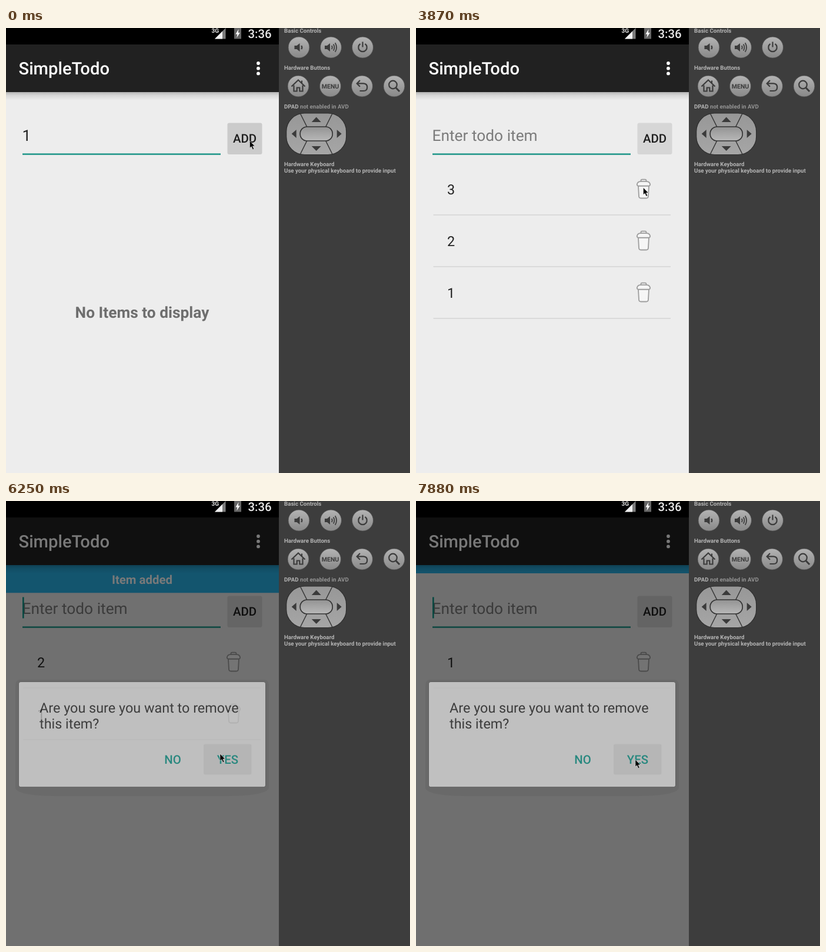
These frames come from a looping animation (687x757 px, 8000 ms). An HTML page:

```html
<!DOCTYPE html>
<html lang="en">
<head>
<meta charset="utf-8">
<title>Todo list</title>
<style>
  html, body { margin: 0; width: 100%; height: 100%; overflow: hidden; background: #3d3d3d; }
  svg { display: block; width: 687px; height: 757px; font-family: Roboto, sans-serif; text-rendering: geometricPrecision; }
  .mid { text-anchor: middle; }
  .medium { font-weight: 500; }
  .bold { font-weight: 700; }
  .f14 { font-size: 20.4px; }
  .f16 { font-size: 23.4px; }
  .f18 { font-size: 26.3px; }
  .label { font-size: 9.7px; font-weight: 700; fill: #b4b4b4; }
  .icon { fill: none; stroke: #3b3b3b; stroke-width: 2.2; }
  .solid { fill: #3b3b3b; }
</style>
</head>
<body>
<svg viewBox="0 0 687 757">
  <defs>
    <linearGradient id="shade" x2="0" y2="1">
      <stop offset="0" stop-opacity=".24"/><stop offset=".4" stop-opacity=".09"/><stop offset="1" stop-opacity="0"/>
    </linearGradient>
    <linearGradient id="metal" x2="0" y2="1">
      <stop offset="0" stop-color="#b4b4b4"/><stop offset="1" stop-color="#888"/>
    </linearGradient>
    <linearGradient id="pad" x2="0" y2="1">
      <stop offset="0" stop-color="#979797"/><stop offset="1" stop-color="#a6a6a6"/>
    </linearGradient>
    <linearGradient id="pill" x2="0" y2="1">
      <stop offset="0" stop-color="#939393"/><stop offset="1" stop-color="#b8b8b8"/>
    </linearGradient>
    <circle id="knob" r="18" fill="url(#metal)" stroke="#4c4c4c" stroke-width=".8"/>
    <g id="bin" fill="#f6f6f6" stroke="#9d9d9d" stroke-width="1.8" stroke-linejoin="round">
      <path d="M-9 -5L-8 12.5Q-7.8 16 -4.5 16H4.5Q7.8 16 8 12.5L9 -5Z"/>
      <path d="M-4.5 -12V-14Q-4.5 -15.8 -2.5 -15.8H2.5Q4.5 -15.8 4.5 -14V-12" fill="none"/>
      <path d="M-11.2 -7.5Q-10 -12.3 -5 -12.3H5Q10 -12.3 11.2 -7.5Q11 -5 9 -4.8H-9Q-11 -5 -11.2 -7.5Z"/>
    </g>
    <clipPath id="phone"><path d="M0 0H464V757H0Z"/></clipPath>
  </defs>

  <g clip-path="url(#phone)">
    <path fill="#ededed" d="M0 0H464V757H0Z"/>
    <text id="empty" class="mid bold f18" x="231.5" y="493" fill="#6e6e6e">No Items to display</text>

    <text id="hint" class="f18" x="27.5" y="192" fill="#7b7b7b">Enter todo item</text>
    <text id="typed" class="f18" x="27.5" y="192" fill="#212121"></text>
    <path fill="#2d9c90" d="M28 213.2H365V216.1H28Z"/>
    <rect id="caret" y="163.5" width="2.6" height="36" fill="#0f998b"/>

    <rect id="glow" x="375.5" y="163" width="61.5" height="54" rx="4" opacity="0"/>
    <rect id="add" x="376.5" y="161.5" width="59" height="53.5" rx="3"/>
    <text class="mid medium f14" x="406" y="195.3" fill="#1c1c1c">ADD</text>
    <g id="rows"></g>

    <g id="banner">
      <path fill="#29b3e8" d="M0 109H464V156.2H0Z"/>
      <text class="mid bold f14" x="231.5" y="141" fill="#fff">Item added</text>
    </g>
    <path fill="url(#shade)" d="M0 109H464V123H0Z"/>
    <path fill="#212121" d="M0 28H464V109H0Z"/>
    <text class="medium" font-size="29.2" x="21.5" y="79" fill="#fff">SimpleTodo</text>
    <g fill="#fff"><circle cx="429" cy="60" r="2.9"/><circle cx="429" cy="68.7" r="2.9"/><circle cx="429" cy="77.4" r="2.9"/></g>

    <path id="dim" d="M0 28H464V757H0Z"/>
    <g id="dialog">
      <path opacity=".08" d="M22 304H441Q447 306 447 314V489Q440 502 370 502H92Q22 502 16 489V314Q16 306 22 304Z"/>
      <rect x="22" y="308" width="419" height="178.3" rx="3" stroke="#000" stroke-opacity=".3"/>
      <rect x="22" y="308" width="419" height="178.3" rx="3" fill="#ededed"/>
      <g class="f16" fill="#212121">
        <text x="57" y="359.5">Are you sure you want to remove</text>
        <text x="57" y="386.5">this item?</text>
      </g>
      <rect id="yes" x="336" y="413.5" width="81.5" height="52" rx="3" fill="#dedede"/>
      <g class="mid medium f14" fill="#009688">
        <text x="283.5" y="447">NO</text>
        <text x="377" y="447">YES</text>
      </g>
    </g>

    <path d="M0 0H464V28H0Z"/>
    <text class="bold" font-size="10" x="349.5" y="8" fill="#e6e6e6">3G</text>
    <path fill="#7d7d7d" d="M373.5 0V18.5H355Z"/>
    <path fill="#f2f2f2" d="M368 5.5V18.5H355Z"/>
    <path fill="#666" d="M388 0H400V18.5H388Z"/>
    <path fill="#fff" d="M395.5 2L390.5 10.5H393.4L392.3 16.5L397.8 8H394.7Z"/>
    <text class="medium f14" x="411.5" y="17.3" fill="#e8e8e8">3:36</text>
  </g>

  <g class="label">
    <text x="473" y="8">Basic Controls</text>
    <text x="473" y="71.3">Hardware Buttons</text>
    <text x="473" y="136.8">DPAD <tspan fill="#939393">not enabled in AVD</tspan></text>
    <text x="473" y="235">Hardware Keyboard</text>
    <text x="473" y="246">Use your physical keyboard to provide input</text>
  </g>

  <g transform="translate(498 33)">
    <use href="#knob"/>
    <path class="solid" d="M-7.5 -3H-3.5L1.5 -7V7L-3.5 3H-7.5Z"/>
    <path class="icon" d="M4.3 -3Q6.3 0 4.3 3"/>
  </g>
  <g transform="translate(552.5 33)">
    <use href="#knob"/>
    <path class="solid" d="M-10.5 -3H-6.5L-1.5 -7V7L-6.5 3H-10.5Z"/>
    <path class="icon" style="stroke-width:1.7" d="M1.3 -3Q3.3 0 1.3 3M4.2 -5.5Q7.6 0 4.2 5.5M7.2 -7.8Q12 0 7.2 7.8"/>
  </g>
  <g transform="translate(606.5 33)">
    <use href="#knob"/>
    <path class="icon" d="M-4 -6A7.2 7.2 0 1 0 4 -6M0 -9.5V-.5"/>
  </g>
  <g transform="translate(497 99)">
    <use href="#knob"/>
    <path class="icon" d="M-11.5 .5L0 -10.5L11.5 .5M-7.5 -1.5V8.5H-2.3V2.5H2.3V8.5H7.5V-1.5M6 -5V-9.5"/>
  </g>
  <g transform="translate(551.5 99)">
    <use href="#knob"/>
    <text class="mid bold solid" font-size="10.5" y="4">MENU</text>
  </g>
  <g transform="translate(605.5 99)">
    <use href="#knob"/>
    <path class="icon" d="M-3.5 -10L-8.8 -4.6L-3.5 .8M-8.5 -4.6H2.5Q8.7 -4.2 8.7 1.8Q8.7 8 2.5 8H-4"/>
  </g>
  <g transform="translate(660 99)">
    <use href="#knob"/>
    <circle class="icon" cx="-2" cy="-2.5" r="6.8"/>
    <path class="icon" style="stroke-width:3" d="M3 2.8L9.2 9"/>
  </g>

  <g transform="translate(527.7 180)">
    <rect x="-51" y="-35" width="102" height="70.5" rx="31" fill="url(#pad)" stroke="#2d2d2d" stroke-width="1.2"/>
    <path d="M-27 -34L-16 -12M27 -34L16 -12M-27 34L-16 12M27 34L16 12" stroke="#353535" stroke-width="1.5"/>
    <rect x="-27.5" y="-12" width="55" height="24" rx="11.5" fill="url(#pill)" stroke="#333" stroke-width="1.7"/>
    <path class="solid" d="M-8 -20H8L0 -28.5ZM-8 21H8L0 29ZM-34 -7V7L-42 0ZM35 -7V7L43 0Z"/>
  </g>

  <path id="pointer" d="M0 0V12L2.8 9.7L5 14.7L7.1 13.8L4.9 8.9H8.6Z" stroke="#fff" stroke-width=".5"/>
</svg>
<script>
  const LOOP = 8000, TICK = 148.6, ROW = 88, BANNER = 48;
  const $ = id => document.getElementById(id);
  const set = (id, attrs) => { for (const k in attrs) $(id).setAttribute(k, attrs[k]); };

  // The user's actions, in ms.
  const entries = [
    { text: '1', typed: -600, press: -40, add: 145 },
    { text: '2', typed: 1780, press: 1990, add: 2075 },
    { text: '3', typed: 2970, press: 2880, add: 3080 },
  ];
  const banners = [{ open: 130, close: 3490 }, { open: 3885, close: 7625 }];
  const dialogs = [{ open: 5060, close: 6150 }, { open: 7060, close: 7786 }];
  const moves = [
    { from: 3450, to: 4010, x: 386, y: 273 },
    { from: 5360, to: 5950, x: 364, y: 430 },
    { from: 6250, to: 6830, x: 389, y: 272 },
    { from: 7140, to: 7600, x: 373, y: 440 },
  ];

  const ramp = (t, start, length) => Math.min(1, Math.max(0, (t - start) / length));
  const ease = u => .5 - .5 * Math.cos(Math.PI * u);
  const easeOut = u => 1 - (1 - u) ** 3;
  const sum = (list, fn) => list.reduce((total, e) => total + fn(e), 0);
  const shown = (list, t, fadeIn, fadeOut) =>
    sum(list, e => ease(ramp(t, e.open, fadeIn)) - ease(ramp(t, e.close, fadeOut)));

  // The caret restarts at each edit and stands still while a dialog is open.
  function caretOn(t) {
    const edits = entries.flatMap(e => [e.typed, e.add]).filter(ms => ms <= t);
    const paused = sum(dialogs, d => Math.max(0, Math.min(t, d.close) - d.open));
    return (t - paused - Math.max(...edits) + 60) % 990 < 500;
  }

  function pointer(t) {
    return moves.reduce((p, m) => {
      const u = easeOut(ramp(t, m.from, m.to - m.from));
      return { x: p.x + (m.x - p.x) * u, y: p.y + (m.y - p.y) * u };
    }, { x: 414.5, y: 192 });
  }

  const rowSvg = ({ text }, n) => `<g transform="translate(0 ${n * ROW})">
    <text class="f16" x="53" y="283" fill="#212121">${text}</text>
    <use href="#bin" x="387" y="273.5"/>
    <path fill="#d5d5d5" d="M29.5 317.3H433V318.8H29.5Z"/></g>`;

  function draw(t) {
    const editing = entries.find(e => e.typed <= t && t < e.add);
    const removed = dialogs.filter(d => d.close <= t).length;
    const list = entries.filter(e => e.add <= t).reverse().slice(removed);
    const down = sum(entries, e => Math.max(0, ramp(t, e.press, 80) - ramp(t, e.add, 300)));
    const grey = Math.round(214 - 22 * down);
    const { x, y } = pointer(t);

    $('typed').textContent = editing ? editing.text : '';
    $('rows').innerHTML = list.map(rowSvg).join('');
    set('hint', { opacity: editing ? 0 : 1 });
    set('empty', { opacity: list.length ? 0 : 1 });
    set('caret', { x: editing ? 42 : 28, opacity: caretOn(t) ? 1 : 0 });
    set('add', { fill: `rgb(${grey},${grey},${grey})` });
    set('glow', { opacity: Math.max(0, down - .5) * .3 });
    set('banner', { transform: `translate(0 ${BANNER * (shown(banners, t, 400, 400) - 1)})` });
    set('dim', { opacity: .6 * shown(dialogs, t, 140, 400) });
    set('dialog', { opacity: shown(dialogs, t, 140, 220) });
    set('yes', { opacity: dialogs.some(d => t > d.close - 100 && t < d.close + 220) ? 1 : 0 });
    set('pointer', { transform: `translate(${x} ${y})` });
  }

  // The screen refreshes in even ticks, like a recording.
  let last = -1;
  function loop() {
    const tick = Math.floor(performance.now() % LOOP / TICK);
    if (tick !== last) draw((last = tick) * TICK);
    requestAnimationFrame(loop);
  }
  loop();
</script>
</body>
</html>
```
